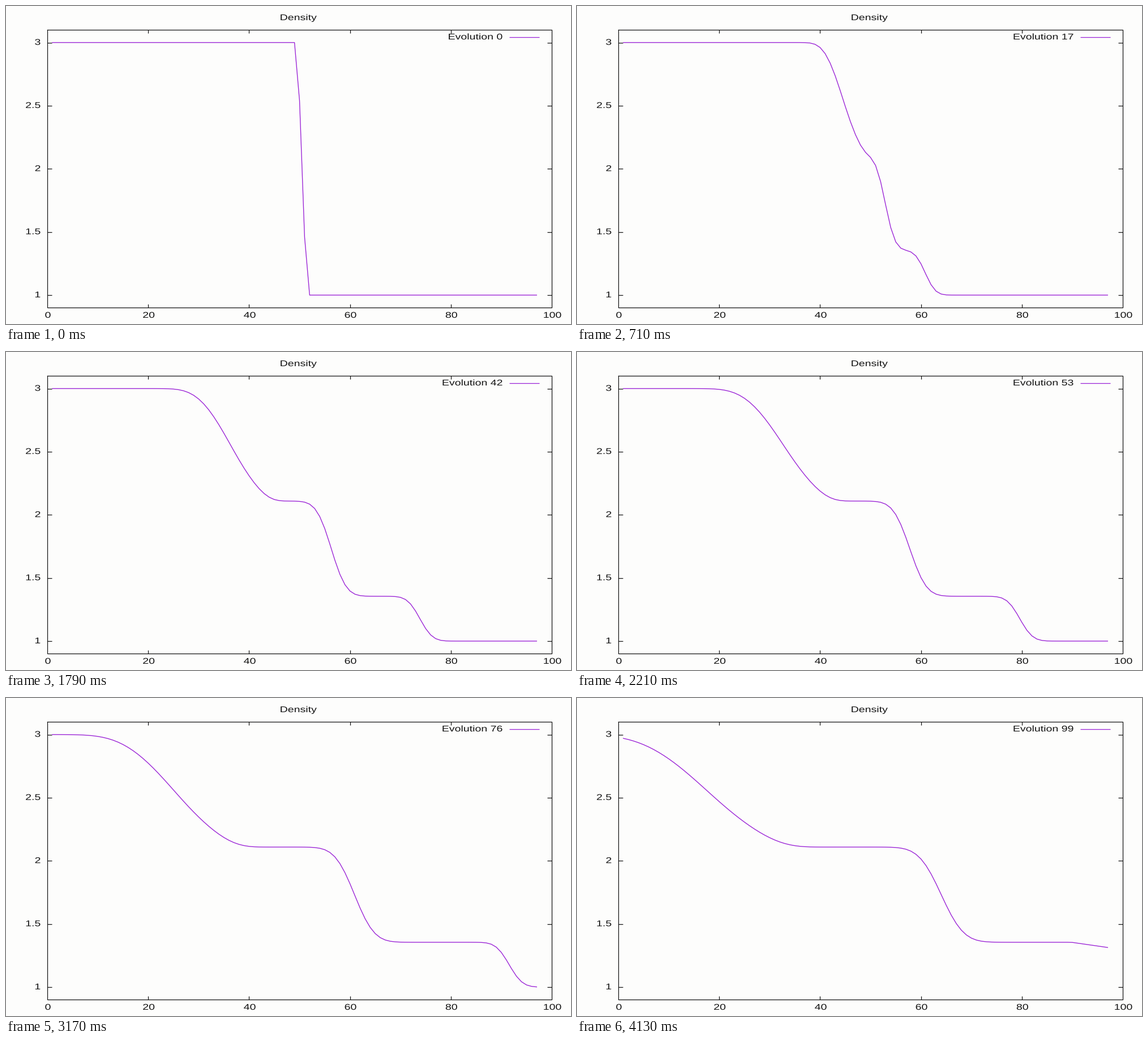
A matplotlib script that plays this animation: 998 px wide and 561 px high, repeating every 4.18 s.

```python
import math

import matplotlib.pyplot as plt
import numpy as np
from matplotlib.animation import FuncAnimation
from matplotlib.patches import PathPatch
from matplotlib.textpath import TextPath
from matplotlib.transforms import Affine2D

W, H, DPI = 998, 561, 64
LEFT, RIGHT, TOP, BOTTOM = 73, 964, 42, 532
LOOP, TICK, FPS, STEPS = 4180, 20, 24, 100
INK, PURPLE, PAPER = "#141414", "#9a22d6", "#fdfdfc"
FONT_PX, ASPECT = 14.7, 1.33   # the whole plot is set in wide pixels

erfc = np.vectorize(math.erfc)
cells = np.arange(1, 98)


def px(x):
    return LEFT + (RIGHT - LEFT) * x / 100


def py(rho):
    return 510 - 222.75 * (rho - 1)


def pt(pixels):
    return pixels * 72 / DPI


def front(z):
    """Smeared step falling from 1 to 0."""
    return erfc(z / math.sqrt(2)) / 2


def density(n):
    """Shock tube profile: rarefaction, contact and shock after n steps."""
    if n == 0:
        return np.interp(cells, [49, 50, 51, 52], [3, 2.54, 1.46, 1])
    start = math.exp(-n / 4)

    shock_x = 50.5 + 0.5205 * n + 1.5 * (1 - start)
    shock_w = 2.1 * math.sqrt(1 - math.exp(-(n + 2) / 22))
    contact_x = 50.6 + 0.1355 * n
    contact_w = math.sqrt(0.35 + 0.12 * n)
    fan_x = 50.08 - 0.328 * n + 0.42 * start
    fan_w = 1.4 + 0.0854 * n - 0.7 * start

    s = (cells - fan_x) / fan_w
    fan = s + np.where(s > 0, 0.05 * s**4, 0.03 * s**3)
    rho = (1 + 0.355 * front((cells - shock_x) / shock_w)
           + 0.754 * front((cells - contact_x) / contact_w)
           + 0.891 * front(fan))

    # weak reflection once the shock has left on the right
    reach = 0.6 * max(0, n - 87)
    return rho - 0.0057 * np.maximum(0, cells - 97 + reach) * (reach > 0)


def glyphs(s, x, y, align):
    """Text outline in stage pixels, anchored at its baseline."""
    def outline(t):
        return TextPath((0, 0), t, size=FONT_PX,
                        prop={"family": "Liberation Sans"})

    box = outline(s.replace("1", "0")).get_extents()
    anchor = box.x1 if align == "right" else (box.x0 + box.x1) / 2
    place = Affine2D().translate(-anchor, 0).scale(ASPECT, -1).translate(x, y)
    return place.transform_path(outline(s))


def write(s, x, y, align="center"):
    patch = PathPatch(glyphs(s, x, y, align), fc=INK, lw=0)
    return ax.add_patch(patch)


def stroke(xs, ys, color=INK, width=1.25, **kw):
    return ax.plot(xs, ys, color=color, lw=pt(width), **kw)[0]


fig = plt.figure(figsize=(W / DPI, H / DPI), dpi=DPI, facecolor=PAPER)
ax = fig.add_axes([0, 0, 1, 1])
ax.set_axis_off()
ax.set_xlim(0, W)
ax.set_ylim(H, 0)

stroke([LEFT, RIGHT, RIGHT, LEFT, LEFT], [TOP, TOP, BOTTOM, BOTTOM, TOP],
       solid_joinstyle="miter")
for v in range(0, 101, 20):
    x = px(v)
    write(str(v), x + 1, 550)
    if 0 < v < 100:
        stroke([x, x], [TOP, TOP + 6], solid_capstyle="butt")
        stroke([x, x], [BOTTOM - 6, BOTTOM], solid_capstyle="butt")
for v in (1, 1.5, 2, 2.5, 3):
    y = py(v)
    write(f"{v:g}", 60.5, y + 4, "right")
    stroke([LEFT, LEFT + 8], [y, y], solid_capstyle="butt")
    stroke([RIGHT - 8, RIGHT], [y, y], solid_capstyle="butt")

write("Density", 517, 25)
stroke([889, 942], [55, 55], PURPLE, solid_capstyle="butt")
label = write("Evolution 0", 876.5, 59, "right")
curve = stroke(px(cells), py(density(0)), PURPLE, 1.35, zorder=3)


def update(i):
    n = min(STEPS - 1, (TICK * i + TICK // 2) * FPS // 1000)
    curve.set_ydata(py(density(n)))
    label.set_path(glyphs(f"Evolution {n}", 876.5, 59, "right"))
    return curve, label


anim = FuncAnimation(fig, update, frames=LOOP // TICK, interval=TICK,
                     repeat=True, repeat_delay=0)
plt.show()
```
